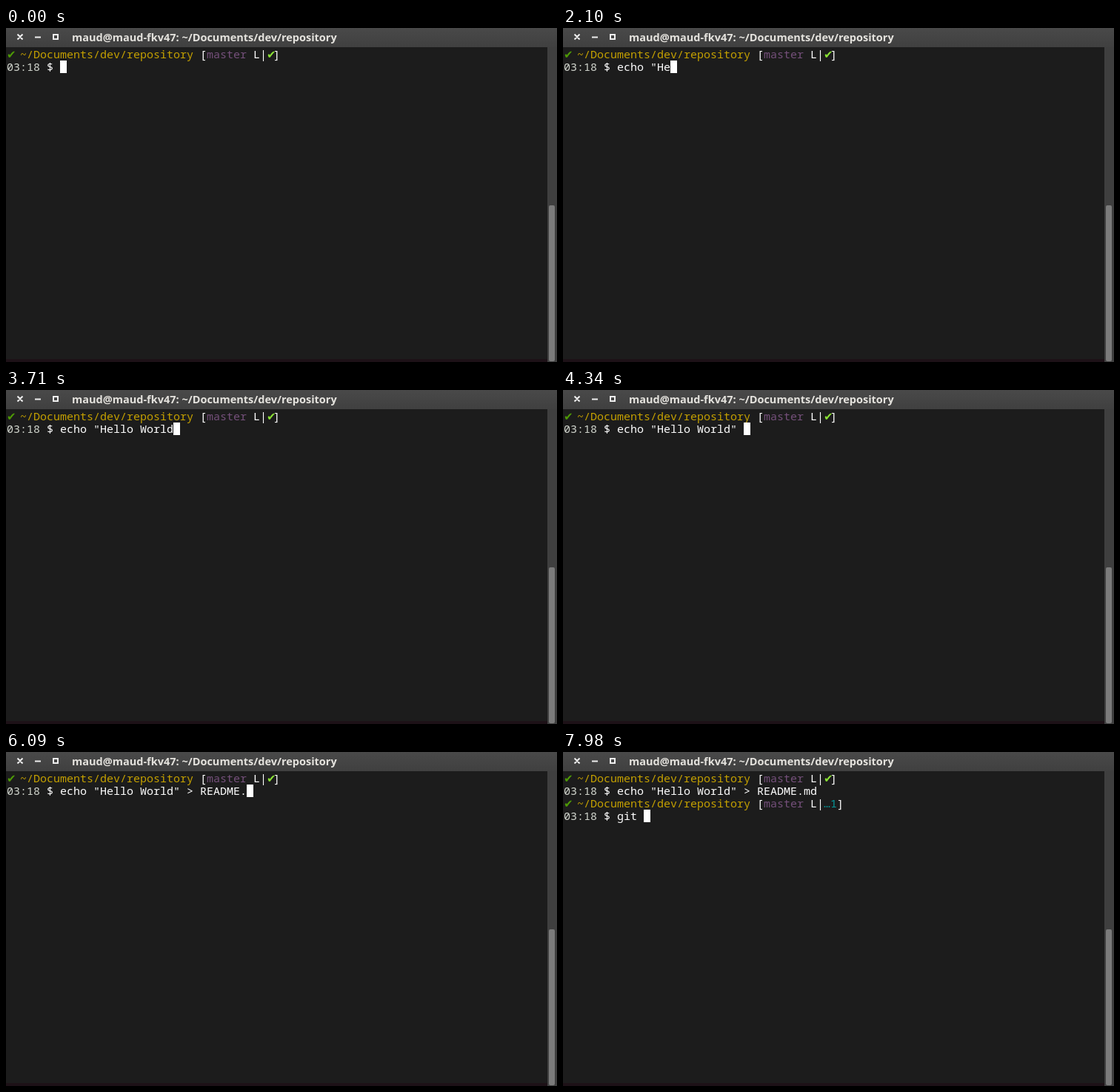
An HTML page that plays this animation: 744 px wide and 452 px high, repeating every 8 s.

```html
<!DOCTYPE html>
<html lang="en">
<head>
<meta charset="utf-8">
<title>Terminal</title>
<style>
  html, body { margin: 0; width: 100%; height: 100%; overflow: hidden; background: #1c1c1c; }
  svg { display: block; }
  text { font: 15px "Noto Sans Mono", monospace; fill: #fff; white-space: pre; }
  .title { font: bold 14.5px "Noto Sans", sans-serif; fill: #e4e2dd; }
  .check { font: 15px "DejaVu Sans", sans-serif; fill: #4e9a06; }
  .bright { fill: #8ae234; }
  .path { fill: #c4a000; }
  .branch { fill: #75507b; }
  .count { fill: #06989a; }
  .time { fill: #d3d7cf; }
</style>
</head>
<body>
<svg width="744" height="452" viewBox="0 0 744 452">
  <defs>
    <linearGradient id="bar" x2="0" y2="1">
      <stop stop-color="#494949"/>
      <stop offset="1" stop-color="#404040"/>
    </linearGradient>
  </defs>
  <rect width="744" height="452" fill="#1c1c1c"/>
  <rect y="448" width="744" height="4" fill="#1d1117"/>
  <rect x="731" y="26" width="13" height="426" fill="#3f3f3f"/>
  <rect x="733" y="240" width="8" height="211" rx="2" fill="#7b7b7b"/>
  <rect width="744" height="26" fill="url(#bar)"/>
  <path d="M15.5 8.5l7 7m0-7l-7 7M39 12.5h8M64 9h6v6h-6z" fill="none" stroke="#eee" stroke-width="2"/>
  <text class="title" x="89" y="18">maud@maud-fkv47: ~/Documents/dev/repository</text>
  <g id="screen"></g>
  <rect id="cursor" width="9" height="17" fill="#fff"/>
</svg>
<script>
const LOOP = 8000, CELL = 9, LINE = 17, LEFT = 1, TOP = 44, PROMPT = 8;
const BLINK_OFF = 1190, SUBMIT_BLINK = 7000, ENTER = 7070, READY = 7140;
const first = {
  text: 'echo "Hello World" > README.md',
  keys: [140, 420, 560, 630, 1260, 1470, 1960, 2100, 2590, 2730, 2870, 3080, 3220, 3360, 3500,
    3640, 3710, 4060, 4340, 4620, 4760, 5180, 5250, 5390, 5460, 5600, 5740, 6090, 6300, 6370]
};
const second = { text: 'git ', keys: [7770, 7840, 7910, 7980] };
const screen = document.getElementById('screen');
const cursor = document.getElementById('cursor');

function write(parent, row, col, text, style = '') {
  const node = document.createElementNS('http://www.w3.org/2000/svg', 'text');
  node.setAttribute('x', LEFT + col * CELL);
  node.setAttribute('y', TOP + row * LINE + 14);
  node.setAttribute('class', style);
  node.textContent = text;
  parent.append(node);
  return node;
}

// Prints the two prompt lines and returns their group and input text.
function prompt(row, status, style) {
  const group = document.createElementNS('http://www.w3.org/2000/svg', 'g');
  screen.append(group);
  write(group, row - 1, 0, '✔', 'check');
  write(group, row - 1, 2, '~/Documents/dev/repository', 'path');
  write(group, row - 1, 29, '[');
  write(group, row - 1, 30, 'master', 'branch');
  write(group, row - 1, 37, 'L|');
  write(group, row - 1, 39, status, style);
  write(group, row - 1, 39 + status.length, ']');
  write(group, row, 0, '03:18', 'time');
  write(group, row, 6, '$');
  return { group, input: write(group, row, PROMPT, '') };
}

const upper = prompt(0, '✔', 'check bright');
const lower = prompt(2, '…1', 'count');

function typed(command, t) {
  return command.text.slice(0, command.keys.filter(k => k <= t).length);
}

function draw(t) {
  const a = typed(first, t), b = typed(second, t);
  upper.input.textContent = a;
  lower.input.textContent = b;
  lower.group.style.display = t < READY ? 'none' : '';

  let row = 0, col = PROMPT + a.length;
  if (t >= READY) [row, col] = [2, PROMPT + b.length];
  else if (t >= ENTER) [row, col] = [1, 0];
  cursor.setAttribute('x', LEFT + col * CELL);
  cursor.setAttribute('y', TOP + row * LINE);
  const hidden = (t >= BLINK_OFF && t < first.keys[4]) || (t >= SUBMIT_BLINK && t < ENTER);
  cursor.style.display = hidden ? 'none' : '';
}

const start = performance.now();
function tick() {
  draw((performance.now() - start) % LOOP);
  requestAnimationFrame(tick);
}
tick();
</script>
</body>
</html>
```
